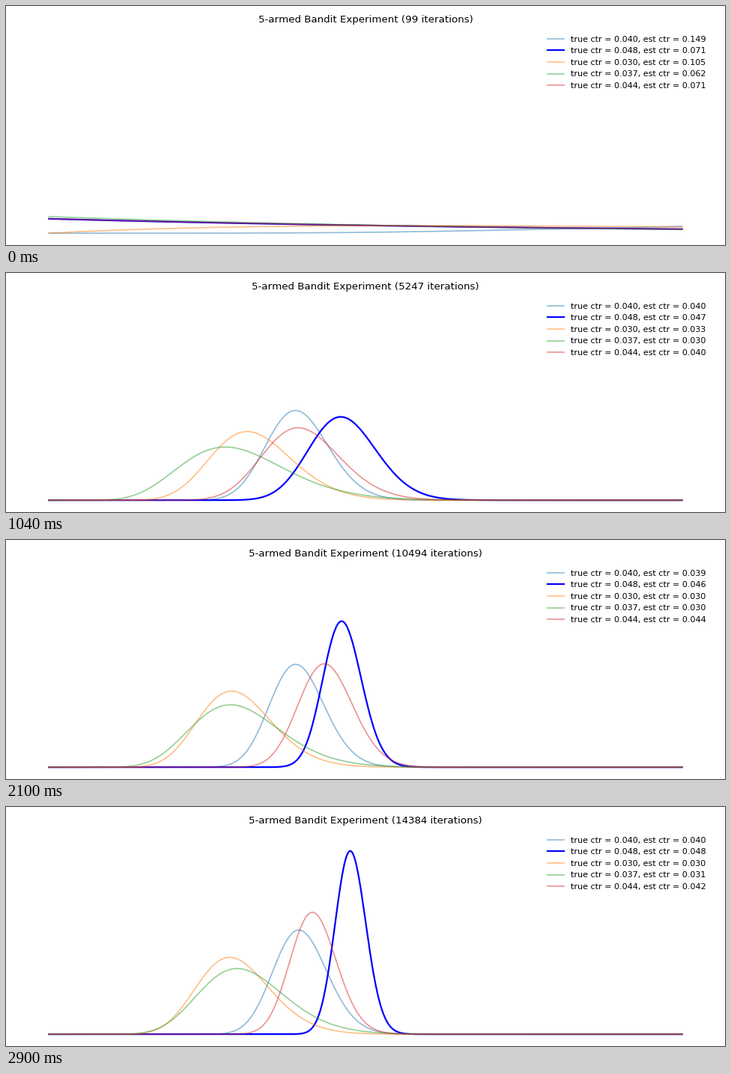
A matplotlib script that plays this animation: 960x320 px, repeating every 2920 ms.

```python
import math

import matplotlib.pyplot as plt
import numpy as np
from matplotlib.animation import FuncAnimation

W, H, DPI = 960, 320, 80
FRAMES, STEP, LAST = 146, 99, 14384

# Plot area and data scale, in pixels from the top left
LEFT, RIGHT, TOP, BOTTOM = 15, 945, 29.75, 308
BASE, UNIT = 304.2, 1.485

# Each arm starts from a Beta(1, 1) prior, and counting starts at zero
EXTRA = 11
MILESTONES = np.log([99, 1683, 5247, 8415, 14384])

# True rate, colour, estimated rate at the milestones, and the growth of its
# trials (start, cap, time scale, power); the best arm gets all the rest
ARMS = [
    (0.040, "C0", [0.149, 0.0387, 0.0396, 0.0389, 0.0397], (47, 2080, 4250, 1.25)),
    (0.048, "blue", [0.0714, 0.0380, 0.0467, 0.0456, 0.0477], None),
    (0.030, "C1", [0.105, 0.0348, 0.0321, 0.0303, 0.0301], (19, 825, 2700, 1.1)),
    (0.037, "C2", [0.0625, 0.0288, 0.0293, 0.0304, 0.0312], (16, 1000, 14700, 0.7)),
    (0.044, "C3", [0.0714, 0.0260, 0.0400, 0.0450, 0.0420], (14, 4500, 13300, 1.45)),
]

x = np.linspace(0, 0.1, 800)
log_x = np.log(np.maximum(x, 1e-12))
log_1x = np.log1p(-x)


def beta_pdf(a, b):
    norm = math.lgamma(a + b) - math.lgamma(a) - math.lgamma(b)
    return np.exp(norm + (a - 1) * log_x + (b - 1) * log_1x)


def grow(n, start, cap, scale, power):
    return round(start + cap * (1 - math.exp(-((n - STEP) / scale) ** power)))


def posteriors(n):
    """Clicks and trials of every arm after n iterations."""
    trials = [grow(n, *arm[3]) if arm[3] else 0 for arm in ARMS]
    rest = n + EXTRA - sum(trials)
    for arm, t in zip(ARMS, trials):
        t = t or rest
        yield round(float(np.interp(math.log(n), MILESTONES, arm[2])) * t), t


plt.rcParams["font.family"] = "DejaVu Sans"
plt.rcParams["text.kerning_factor"] = 6
fig = plt.figure(figsize=(W / DPI, H / DPI), dpi=DPI, facecolor="white")
ax = fig.add_axes([LEFT / W, 1 - BOTTOM / H, (RIGHT - LEFT) / W, (BOTTOM - TOP) / H])
ax.set_xlim(-0.005, 0.105)
ax.set_ylim((BASE - BOTTOM) / UNIT, (BASE - TOP) / UNIT)
ax.axis("off")

title = ax.set_title("", fontsize=12, pad=6.9)
lines = []
for rate, color, _, growth in ARMS:
    style = dict(alpha=0.5, lw=1.5) if growth else dict(lw=2)
    label = f"true ctr = {rate:.3f}, est ctr = 0.000"
    lines += ax.plot(x, 0 * x, color=color, label=label, **style)
legend = ax.legend(loc="upper right", frameon=False, fontsize=10)


def update(i):
    n = min((i + 1) * STEP, LAST)
    title.set_text(f"5-armed Bandit Experiment ({n} iterations)")
    for arm, line, text, (a, t) in zip(ARMS, lines, legend.get_texts(), posteriors(n)):
        line.set_ydata(beta_pdf(a, t - a))
        text.set_text(f"true ctr = {arm[0]:.3f}, est ctr = {a / t:.3f}")
    return [title, *lines, legend]


anim = FuncAnimation(fig, update, frames=FRAMES, interval=20,
                     repeat=True, repeat_delay=0, blit=False)
plt.show()
```
